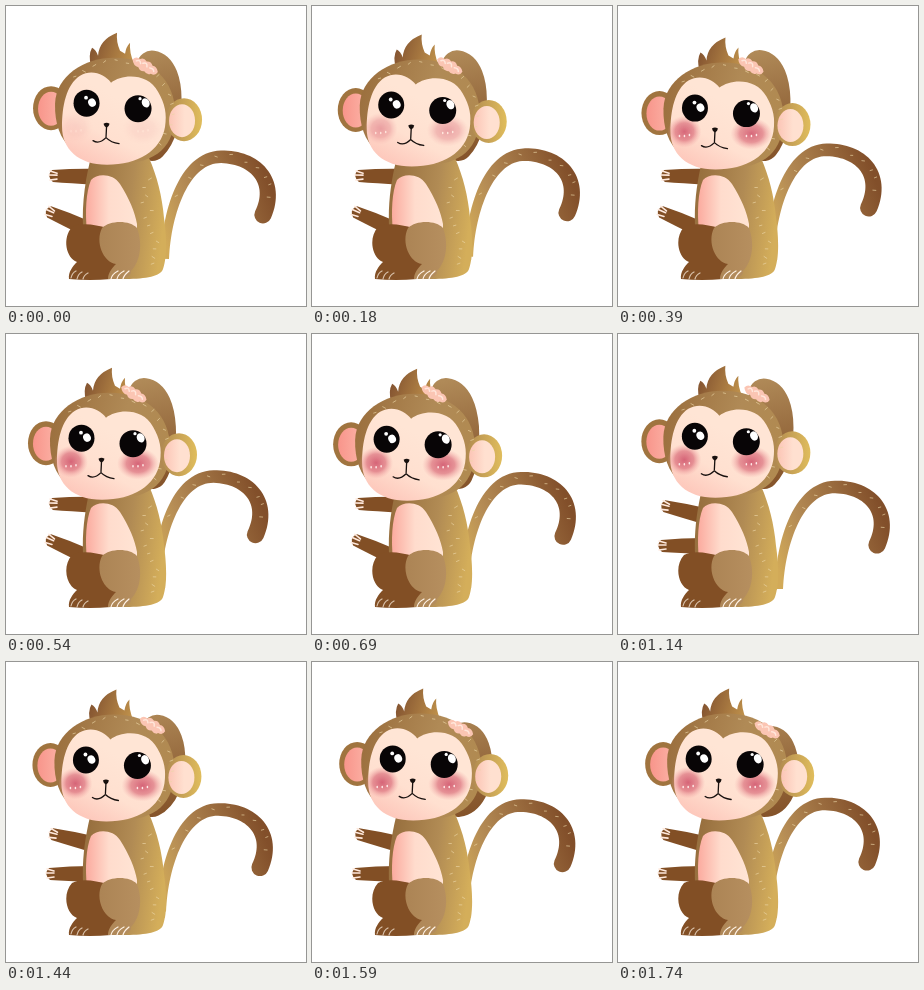
Recreate the animation shown at these times as an HTML page. Size 300 by 300 pixels, loop 1.77 s.

```html
<!DOCTYPE html>
<html lang="en">
<head>
<meta charset="utf-8">
<title>Monkey</title>
<style>
html, body { margin: 0; width: 100%; height: 100%; overflow: hidden; background: #fff; }
svg { display: block; width: 100%; height: 100%; }
.mark { fill: none; stroke: #ecd6a6; stroke-width: 1; stroke-linecap: round; opacity: .65; }
.toe { fill: none; stroke: #fff3e6; stroke-width: 1.2; stroke-linecap: round; }
.ink { fill: none; stroke: #17100e; stroke-width: 1.3; stroke-linecap: round; }
.dark { fill: #824f25; }
</style>
</head>
<body>
<svg viewBox="0 0 300 300">
  <defs>
    <linearGradient id="tailFill" gradientUnits="userSpaceOnUse" x1="160" y1="235" x2="270" y2="195">
      <stop offset="0" stop-color="#d2aa58"/><stop offset=".3" stop-color="#b58c55"/><stop offset="1" stop-color="#824f2a"/>
    </linearGradient>
    <linearGradient id="bodyFill" gradientUnits="userSpaceOnUse" x1="80" y1="190" x2="160" y2="200">
      <stop offset="0" stop-color="#98703f"/><stop offset=".55" stop-color="#b18b54"/><stop offset="1" stop-color="#d4ae5a"/>
    </linearGradient>
    <linearGradient id="bellyFill">
      <stop offset="0" stop-color="#fbab9f"/><stop offset=".45" stop-color="#ffdccd"/><stop offset="1" stop-color="#ffe4d4"/>
    </linearGradient>
    <linearGradient id="legFill">
      <stop offset="0" stop-color="#ac8455"/><stop offset="1" stop-color="#b68f5f"/>
    </linearGradient>
    <linearGradient id="armFill" gradientUnits="userSpaceOnUse" x1="140" y1="45" x2="165" y2="155">
      <stop offset="0" stop-color="#b08a58"/><stop offset=".45" stop-color="#9a6f42"/><stop offset="1" stop-color="#835128"/>
    </linearGradient>
    <linearGradient id="headFill" gradientUnits="userSpaceOnUse" x1="50" y1="80" x2="172" y2="115">
      <stop offset="0" stop-color="#9b6f3e"/><stop offset=".55" stop-color="#b08a56"/><stop offset="1" stop-color="#b18a50"/>
    </linearGradient>
    <linearGradient id="hairFill" gradientUnits="userSpaceOnUse" x1="88" y1="38" x2="126" y2="50">
      <stop offset="0" stop-color="#875732"/><stop offset="1" stop-color="#bd8f4a"/>
    </linearGradient>
    <linearGradient id="faceFill" gradientUnits="userSpaceOnUse" x1="72" y1="158" x2="108" y2="90">
      <stop offset="0" stop-color="#fdc4b8"/><stop offset=".5" stop-color="#ffe0d0"/><stop offset="1" stop-color="#ffe5d5"/>
    </linearGradient>
    <linearGradient id="rightEarFill">
      <stop offset="0" stop-color="#b18a50"/><stop offset="1" stop-color="#e0bd5c"/>
    </linearGradient>
    <linearGradient id="leftInnerFill">
      <stop offset="0" stop-color="#f8958b"/><stop offset="1" stop-color="#fcb5a8"/>
    </linearGradient>
    <linearGradient id="rightInnerFill">
      <stop offset="0" stop-color="#fcc5b6"/><stop offset=".6" stop-color="#ffe0d0"/>
    </linearGradient>
    <radialGradient id="blushFill">
      <stop offset="0" stop-color="#d25a70" stop-opacity=".92"/>
      <stop offset=".55" stop-color="#db6f7c" stop-opacity=".7"/>
      <stop offset="1" stop-color="#f3a4a4" stop-opacity="0"/>
    </radialGradient>
    <g id="forearm">
      <path class="dark" d="M4-6Q25-8 46-8V8Q22 7 5 6Q-2 0 4-6Z"/>
      <path fill="none" stroke="#ffe9dd" stroke-width="1.6" stroke-linecap="round" d="M2-5L9-3M1-1H9M2 4L9 3"/>
    </g>
  </defs>

  <g id="tail">
    <path id="tailShape" fill="url(#tailFill)"/>
    <path id="tailMarks" class="mark"/>
  </g>
  <path id="scratchArm" fill="none" stroke="url(#armFill)" stroke-width="30" stroke-linecap="round"/>
  <use id="upperArm" href="#forearm"/>
  <use id="lowerArm" href="#forearm"/>

  <path fill="url(#bodyFill)" d="M84 155C78 180 75 205 78 235L103 273H120C140 273 155 270 157 263C162 250 160 225 158 212C156 190 151 170 143 152Z"/>
  <path fill="url(#bellyFill)" d="M81 226C79 205 80 186 85 174C91 167 107 167 114 178C123 192 129 206 131 218V226Z"/>
  <path class="dark" d="M66 221C76 216 90 219 101 222L113 250L105 273Q84 275 63 273C62 266 67 260 71 256C60 252 56 232 66 221Z"/>
  <path fill="url(#legFill)" d="M96 222C104 214 124 214 131 222C137 238 134 256 125 265Q126 274 102 273C102 267 106 262 110 258C97 256 89 236 96 222Z"/>
  <path class="toe" stroke-opacity=".7" d="M65 272Q66 267 70 265M71 273Q72 268 76 266M77 273Q78 269 82 267"/>
  <path class="toe" d="M105 273Q106 268 112 265M111 273Q112 268 118 265M117 273Q118 269 123 265"/>
  <path id="bodyMarks" class="mark"/>

  <g id="head">
    <ellipse cx="45" cy="102.500" rx="18" ry="22" fill="#a0743f"/>
    <ellipse cx="45" cy="103" rx="13" ry="17" fill="url(#leftInnerFill)"/>
    <path fill="url(#hairFill)" d="M85 60Q82 49 86 42Q90 44 92 50Q93 34 111 27Q110 36 114 45L119 48Q120 41 124 37Q123 46 128 58Z"/>
    <path fill="url(#headFill)" d="M49 98C50 70 78 52 108 52C146 52 169 75 169 107C169 140 151 158 112 158C72 158 48 138 49 98Z"/>
    <path fill="url(#faceFill)" d="M105 77C116 68 142 67 152 86C159 98 161 108 159 121C155 145 132 159 101 159C72 159 56 143 56 121C56 101 60 79 74 70C86 63 99 69 105 77Z"/>
    <ellipse cx="178" cy="114" rx="18" ry="21.500" fill="url(#rightEarFill)"/>
    <ellipse cx="176" cy="115" rx="13" ry="16.500" fill="url(#rightInnerFill)"/>
    <path id="headMarks" class="mark"/>
    <g id="blush">
      <ellipse cx="70" cy="121" rx="17" ry="16" fill="url(#blushFill)"/>
      <ellipse cx="137" cy="123" rx="21" ry="16" fill="url(#blushFill)"/>
      <path stroke="#ffe9e7" stroke-width="1.500" stroke-linecap="round" d="M65 125v1M70 125v1M75 124v1M132 125v1M137 125v1M142 124v1"/>
    </g>
    <ellipse cx="80.500" cy="97.500" rx="13" ry="13.500" fill="#080506"/>
    <ellipse cx="132" cy="103" rx="13.500" ry="13.500" fill="#080506"/>
    <g fill="#fff">
      <ellipse cx="86" cy="97" rx="3.800" ry="4.300" transform="rotate(-25 86 97)"/>
      <circle cx="80" cy="92" r="1.900"/>
      <ellipse cx="139.500" cy="97.500" rx="3.800" ry="4.800" transform="rotate(-25 139 97)"/>
      <circle cx="134" cy="93" r="1.600"/>
    </g>
    <path fill="#17100e" d="M97.500 118Q100.500 116 103.500 118Q103 121 100.500 122Q98 121 97.500 118Z"/>
    <path class="ink" d="M100.500 121L100 131M87 135Q93 139 100 132Q105 137 113 138"/>
  </g>

  <g id="hand">
    <path fill="#fbc5b3" d="M-14-2Q-12-7-7-5Q-4-8 0-5Q4-7 7-3Q11-4 14 1Q13 6 8 5Q5 8 1 5Q-3 7-6 3Q-11 4-14-2Z"/>
    <path fill="none" stroke="#ffe6da" stroke-width="1.500" stroke-linecap="round" d="M-10-2q3-3 5 1M-3-2q4-3 5 2M5 0q4-1 5 2"/>
  </g>
</svg>
<script>
const LOOP = 1770;
const STEP = 30;
const ARM_SWAP = 1050;
const HAND_LEFTMOST = 690;
const HAND_RIGHTMOST = 1740;
const $ = id => document.getElementById(id);
const place = (id, x, y, turn = 0) =>
  $(id).setAttribute('transform', `translate(${x} ${y}) rotate(${turn})`);
const mix = (a, b, k) => a + (b - a) * k;
const wave = k => (1 - Math.cos(k * Math.PI)) / 2;

let seed = 7;
const random = () => (seed = seed * 16807 % 2147483647) / 2147483647;
const dash = (x, y) => `M${x} ${y}l${2 + random()} ${random() * 4 - 2}`;
const scatter = (id, count, spot) => $(id).setAttribute('d',
  Array.from({ length: count }, (_, i) => dash(...spot((i + .5) / count))).join(''));

// Two joined cubics; u runs from the root to the tip of the tail
const tailCurve = [
  [[161, 255], [162, 210], [180, 153], [217, 153]],
  [[217, 153], [252, 153], [274, 178], [259, 211]]
];
function tailPoint(u) {
  const [a, b, c, d] = tailCurve[u < .5 ? 0 : 1];
  const t = u < .5 ? u * 2 : u * 2 - 1, s = 1 - t;
  return [0, 1].map(i => s * s * s * a[i] + 3 * s * s * t * b[i] + 3 * s * t * t * c[i] + t * t * t * d[i]);
}

function buildTail() {
  const left = [], right = [], tipRadius = 8.6;
  for (let u = 0; u <= 1; u += 1 / 64) {
    const [x, y] = tailPoint(u);
    const [x0, y0] = tailPoint(Math.max(0, u - .01));
    const [x1, y1] = tailPoint(Math.min(1, u + .01));
    const half = mix(4, tipRadius, u) / Math.hypot(x1 - x0, y1 - y0);
    const nx = (y1 - y0) * half, ny = (x0 - x1) * half;
    left.push([x + nx, y + ny]);
    right.unshift([x - nx, y - ny]);
  }
  $('tailShape').setAttribute('d',
    `M${left.join('L')}A${tipRadius} ${tipRadius} 0 0 1 ${right.join('L')}Z`);
}

// Eased passage through a few [time, value] turning points
function swing(turns, t) {
  const i = Math.max(1, turns.findIndex(p => p[0] > t));
  const [t0, v0] = turns[i - 1], [t1, v1] = turns[i];
  return mix(v0, v1, wave(Math.min(1, (t - t0) / (t1 - t0))));
}

// 0 with the scratching hand at the right, 1 at the left
function scratch(t) {
  const quarter = Math.PI / 2;
  if (t < HAND_LEFTMOST) return mix(.37, 1, 1 - Math.cos(t / HAND_LEFTMOST * quarter));
  const back = Math.min(1, (t - HAND_LEFTMOST) / (HAND_RIGHTMOST - HAND_LEFTMOST));
  return 1 - Math.sin(back * quarter);
}

function render(t) {
  const nod = wave((t + 115) / LOOP * 2);
  place('head', mix(.3, -6, nod), mix(-.7, 8, nod));

  const lift = swing([[0, .2], [530, .95], [1140, 0], [1740, 1], [LOOP + STEP, 1]], t);
  place('tail', -10 * lift, -11 * lift);

  const s = scratch(t), drop = (1 - s) ** 8;
  const handX = mix(149, 122, s), elbowX = mix(171, 156, s);
  $('scratchArm').setAttribute('d', `M146 140C${elbowX} ${120 + 20 * drop} ${elbowX} ${62 + 20 * drop} ` +
    `${handX + 4 + 8 * s} ${59 + 20 * drop}`);
  place('hand', handX, 60 + 8 * drop, 20);

  const level = t < ARM_SWAP;
  place('upperArm', 42, level ? 170 : 171, level ? 1 : 14);
  place('lowerArm', 39, level ? 204 : 212, level ? 24 : 0);
  $('blush').setAttribute('opacity', mix(.1, 1, Math.min(1, t / 400)));
}

buildTail();
scatter('tailMarks', 10, u => tailPoint(mix(.2, .95, u)).map(v => v + random() * 6 - 3));
scatter('bodyMarks', 12, u => [mix(132, 146, random()) + u * 8, mix(170, 262, u)]);
scatter('headMarks', 16, u => {
  const angle = mix(-2.5, .8, u), reach = mix(.91, .96, random());
  return [109 + 60 * reach * Math.cos(angle), 105 + 53 * reach * Math.sin(angle)];
});

const start = performance.now();
function tick(now) {
  const elapsed = Math.max(0, now - start) % LOOP;
  render(Math.floor(elapsed / STEP) * STEP);
  requestAnimationFrame(tick);
}
render(0);
requestAnimationFrame(tick);
</script>
</body>
</html>
```
